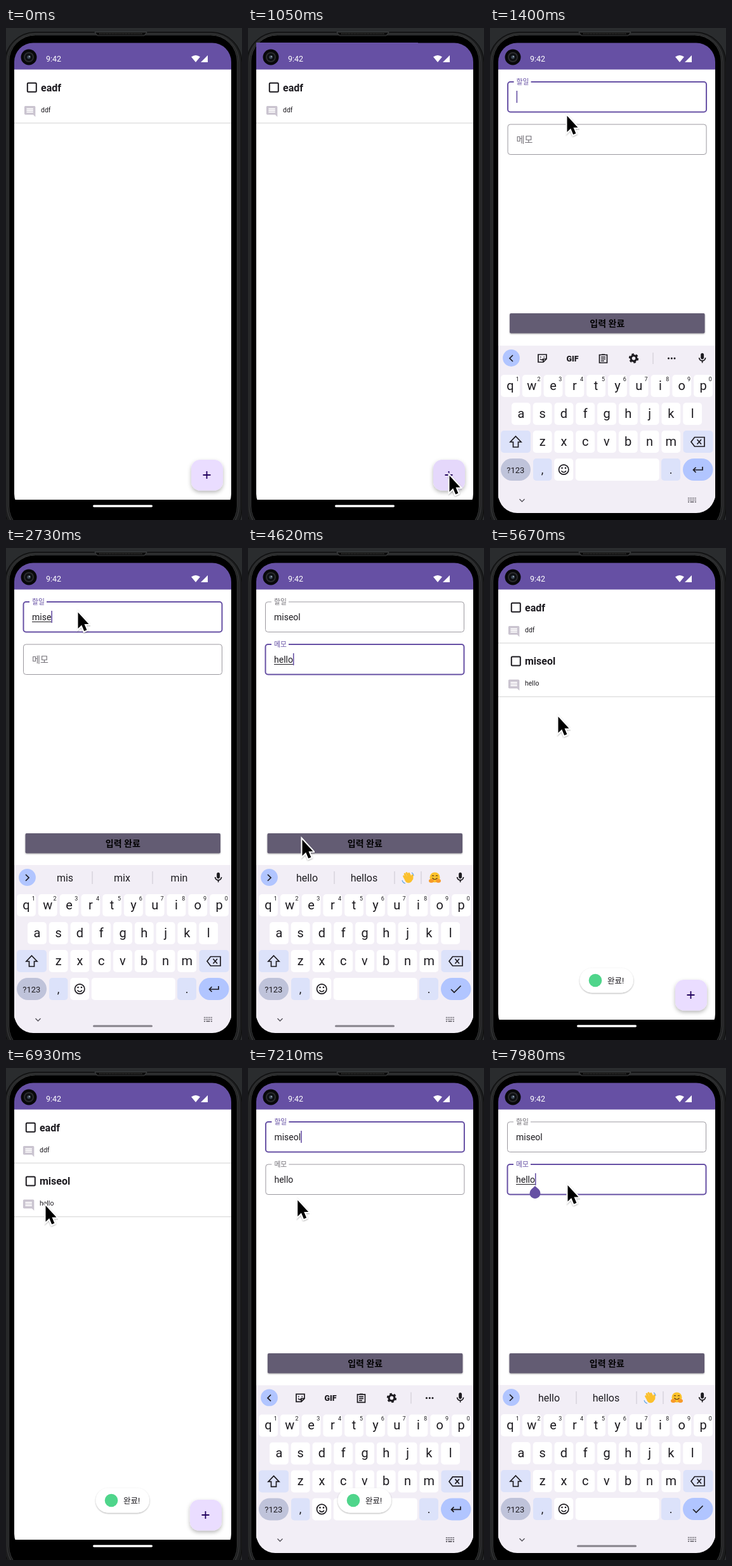
An HTML page for the animation above (8000 ms loop, 372 by 776 pixels).

```html
<!DOCTYPE html>
<html lang="ko">
<head>
<meta charset="utf-8">
<title>Todo app</title>
<style>
html, body { margin: 0; width: 100%; height: 100%; overflow: hidden; background: #2a2c2e; }
svg { display: block; width: 372px; height: 776px; font-family: Roboto, "Noto Sans CJK KR", "Noto Sans CJK", sans-serif; }
.mid { text-anchor: middle; }
.line { fill: none; stroke: #1d1b20; stroke-width: 1.7; }
</style>
</head>
<body>
<script>
const LOOP = 8000;
const WORD = 'miseol', MEMO = 'hello';
const INK = '#1d1b20', PURPLE = '#6650a4';

// ---- markup helpers ----
const rect = (x, y, w, h, r, fill, more = '') =>
  `<rect x="${x}" y="${y}" width="${w}" height="${h}" rx="${r}" fill="${fill}" ${more}/>`;
const circle = (x, y, r, fill, more = '') => `<circle cx="${x}" cy="${y}" r="${r}" fill="${fill}" ${more}/>`;
const text = (x, y, size, s, more = '') => `<text x="${x}" y="${y}" font-size="${size}" ${more}>${s}</text>`;
const mid = (x, y, size, s, more = '') => text(x, y, size, s, 'class="mid" ' + more);
const path = (d, more = 'class="line"') => `<path d="${d}" ${more}/>`;
const g = (id, body, more = '') => `<g id="${id}" ${more}>${body}</g>`;

function phone() {
  return rect(0, 0, 372, 776, 0, '#2a2c2e') +
    rect(-2, 6.5, 374, 800, 48, '#1c1d1e', 'stroke="#0a0a0a"') +
    rect(2, 9, 365, 790, 45, '#0a0a0a', 'stroke="#2e2f30" stroke-width="2.5"') +
    rect(4.5, 11, 360, 785, 42, '#000', 'stroke="#434546" stroke-width="1"') +
    path('M140 6.5H222L218 12H144Z', 'fill="#0c0c0c" stroke="#3f4142"') +
    path('M147 9H215', 'stroke="#333" stroke-width="2" stroke-dasharray="1.5 1"');
}

function statusBar() {
  return rect(13, 23, 342, 42.5, 0, PURPLE) +
    circle(36, 46, 12.5, '#08080a') + circle(36, 46, 8, '#2a2b2e') + circle(36, 46, 6, '#0d0f12') +
    circle(36, 46, 2.8, '#3c4754') + circle(37, 45, 1.2, '#8b99a8') +
    text(63, 53, 12.5, '9:42', 'fill="#fff"') +
    path('M292 45.5Q299 40.5 306 45.5L299 54Z M307 54L318 43V54Z', 'fill="#fff"');
}

function item(y, title, note) {
  return `<g transform="translate(0 ${y})">` +
    rect(33.8, 86.8, 14, 14, 1.5, 'none', `stroke="${INK}" stroke-width="2"`) +
    text(55, 99.5, 16, title, 'font-weight="700"') +
    path('M22 4c0-1.1-.9-2-2-2H4c-1.1 0-2 .9-2 2v12c0 1.1.9 2 2 2h14l4 4zM18 14H6v-2h12zm0-3H6V9h12zm0-3H6V6h12z',
      'fill="#cac4d0" fill-rule="evenodd" transform="translate(27.2 121.2) scale(.87)"') +
    text(55, 132.5, 10.5, note) + rect(-40, 149.3, 460, 1.3, 0, '#dcdcdc') + '</g>';
}

function list() {
  return rect(-40, 65, 460, 679, 0, '#fff') + item(0, 'eadf', 'ddf') + g('second', item(84.6, WORD, MEMO)) +
    rect(292, 681, 50, 48.5, 14, '#eaddff', 'filter="url(#lift)"') +
    g('fabPress', rect(292, 681, 50, 48.5, 14, '#21005d')) +
    path('M316.5 699V711M310.5 705H322.5', 'stroke="#21005d" stroke-width="1.8"');
}

const field = (id, top) => g(id,
  rect(27.5, top, 313, 47.5, 4, 'none', 'class="box"') +
  rect(37, top - 4, 27, 8, 0, '#fff', 'class="gap"') +
  text(41, 0, 14, id === 'todo' ? '할일' : '메모', 'class="label"') +
  text(41, top + 29, 14, '', 'class="value"') +
  rect(41, top + 31, 0, 1, 0, INK, 'class="under"') +
  rect(41, top + 14, 1.6, 19, 0, PURPLE, 'class="caret"'));

function form() {
  return rect(-40, 65, 460, 679, 0, '#fff') + field('todo', 85) + field('memo', 152) +
    g('handle', path('M71 186L77 191.5A8.5 8.5 0 1 1 65 191.5Z', `fill="${PURPLE}"`)) +
    rect(30.5, 450, 307.5, 31.5, 2, '#645b73', 'filter="url(#soft)"') +
    g('btnPress', rect(30.5, 450, 307.5, 31.5, 2, '#000')) +
    mid(184.3, 471, 14, '입력 완료', 'font-weight="700" fill="#000"');
}

function keyboard() {
  const cap = (x, y, w, fill = '#fff', r = 5) => rect(x, y, w, 35, r, fill);
  const row = (s, x0, y) => [...s].map((c, i) => {
    const x = x0 + i * 33.78;
    return cap(x - 14.9, y, 29.8) + mid(x, y + 24, 20, c);
  }).join('');
  const hints = [...'1234567890'].map((c, i) => mid(43.3 + i * 33.78, 556, 9, c)).join('');
  const tools =
    path('M36 515L31 520L36 525') +
    path('M76 514H89V521L84 526H76Z M89 521H84V526 M79 518H80.5M84.5 518H86M79 521Q82 524 84 521') +
    mid(130, 525, 12.5, 'GIF', 'font-weight="900"') +
    path('M172.5 514.5H184.5V527H172.5Z M175 518H182M175 521H182M175 524H180M176 514H181') +
    circle(226.5, 520, 4.4, 'none', `stroke="${INK}" stroke-width="3.2"`) +
    circle(226.5, 520, 6.6, 'none', `stroke="${INK}" stroke-width="2.2" stroke-dasharray="3.6 3.31"`) +
    rect(256.5, 511, 1, 18, 0, '#c9c5d0') +
    [281.5, 286.3, 291].map(x => circle(x, 520, 1.5, INK)).join('');
  const wave = '<g transform="translate(252 520) rotate(-28)" stroke="#fbc02d" stroke-width="3" stroke-linecap="round">' +
    '<ellipse cy="3" rx="6" ry="5.5" fill="#fbc02d" stroke="none"/>' +
    path('M-4.5 2V-5M-1.5 0V-7.5M1.7 0V-7.5M4.6 2V-5M5 5L8 0', '') + '</g>' +
    path('M258 512Q261 514 261 517M243 524Q244 528 248 529', 'fill="none" stroke="#64a8e8" stroke-width="1.2"');
  const hug = circle(294.5, 519.5, 8, '#fcc32c') +
    path('M290 517.5Q291.5 515.5 293 517.5M296 517.5Q297.5 515.5 299 517.5M290.5 520.5Q294.5 525 298.5 520.5',
      'fill="none" stroke="#5d3a14" stroke-width="1.2"') +
    '<ellipse cx="289" cy="525" rx="4" ry="3" fill="#f79a2a"/><ellipse cx="300" cy="525" rx="4" ry="3" fill="#f79a2a"/>';
  const words = path('M31 515L36 520L31 525') + rect(135.5, 510, 1, 20, 0, '#c9c5d0') + rect(230.5, 510, 1, 20, 0, '#c9c5d0') +
    [93, 183, 273].map((x, i) => mid(x, 525.5, 16, '', `id="w${i}"`)).join('') +
    g('emoji', rect(272.5, 510, 1, 20, 0, '#c9c5d0') + wave + hug);
  const dots = [0, 1, 2].map(r => path(`M312 ${740.5 + r * 3}H325`,
    `stroke="#55525a" stroke-width="1.6" stroke-dasharray="${r < 2 ? '1.6 1.2' : '2 1.5 6 1.5'}"`)).join('');
  return rect(13, 500, 342, 270, 0, '#f2eef6') + circle(33.5, 519.5, 13.4, '#b1c5ff') +
    g('tools', tools) + g('words', words) +
    path('M12 14c1.66 0 3-1.34 3-3V5c0-1.66-1.34-3-3-3S9 3.34 9 5v6c0 1.66 1.34 3 3 3zm5-3c0 2.76-2.24 5-5 5s-5-2.24-5-5H5c0 3.53 2.61 6.43 6 6.92V21h2v-3.08c3.39-.49 6-3.39 6-6.92h-2z',
      `fill="${INK}" transform="translate(324.8 510) scale(.82)"`) +
    row('qwertyuiop', 32, 546) + hints + row('asdfghjkl', 48.9, 590) + row('zxcvbnm', 82.6, 634) +
    cap(17, 634, 47, '#dce2fa') + path('M40.5 643L49 652H44.5V660H36.5V652H32Z') +
    cap(304.5, 634, 47, '#dce2fa') + path('M317 651.8L322.5 644.5H338V659H322.5ZM326.5 648L333 655.5M333 648L326.5 655.5') +
    cap(17, 678, 47, '#bfc3da', 17.5) + mid(40.3, 700.5, 13, '?123') +
    cap(68, 678, 29.5, '#dce2fa') + mid(82.6, 702, 18, ',') +
    cap(101.2, 678, 30) + circle(116.2, 695.5, 7.7, 'none', 'class="line"') +
    path('M112.5 697.5Q116.2 702 120 697.5') + circle(113.5, 693, 1.3, INK) + circle(119, 693, 1.3, INK) +
    cap(134.8, 678, 132) + cap(270, 678, 30, '#dce2fa') + mid(285, 702, 18, '.') +
    cap(304, 678, 47.5, '#b1c5ff', 17.5) +
    path('M335 691V696H320.5M324.5 692L320.5 696L324.5 700', 'class="line" id="enter"') +
    path('M320 696L325 701L335.5 690.5', 'class="line" id="check"') +
    path('M46.5 742L50.5 746L54.5 742', 'fill="none" stroke="#55525a" stroke-width="1.4"') + dots;
}

document.body.innerHTML = `<svg viewBox="0 0 372 776" fill="${INK}">
<defs><clipPath id="screen">${rect(13, 23.5, 342, 741.5, 30, '#000')}</clipPath>
<filter id="lift" x="-30%" y="-30%" width="160%" height="170%"><feDropShadow dx="0" dy="3" stdDeviation="3" flood-opacity=".28"/></filter>
<filter id="soft" x="-10%" y="-30%" width="120%" height="180%"><feDropShadow dx="0" dy="1" stdDeviation="1.2" flood-opacity=".35"/></filter></defs>
${phone()}
<g clip-path="url(#screen)">${g('list', list())}${g('form', form())}${statusBar()}
${rect(13, 744, 342, 30, 0, '#000')}${rect(137, 752.3, 94, 3.4, 1.7, '#fff')}
${g('kb', keyboard())}${rect(137, 752.5, 94, 3, 1.5, '#85818a', 'id="pill"')}
${g('toast', rect(141.5, 662.5, 84.5, 39, 19.5, '#fff', 'filter="url(#soft)"') + circle(166, 682, 10.3, '#4fd58b') + text(185, 687, 12.5, '완료!'))}</g>
${g('ring', circle(0, 0, 44.5, 'none', 'stroke="#222" stroke-width="2.5" opacity=".6"'))}
${g('cursor', path('M.5 1V26.5L6.2 21L10.2 30.5L14.4 28.7L10.5 19.5H17.5Z',
    'fill="#000" stroke="#fff" stroke-width="4" paint-order="stroke" filter="url(#soft)"'))}
</svg>`;

// ---- timing ----
const $ = id => document.getElementById(id);
const clamp = v => Math.max(0, Math.min(1, v));
const span = (t, a, b) => clamp((t - a) / (b - a));
const show = (id, o) => $(id).setAttribute('opacity', +o);
const move = (id, x, y) => $(id).setAttribute('transform', `translate(${x.toFixed(2)} ${y.toFixed(2)})`);
const last = (rows, t) => rows.filter(r => r[0] <= t).pop();
const smooth = p => p * p * (3 - 2 * p);
const out = p => 1 - (1 - p) ** 4;

const bez = (u, a, b, c, d) => (1 - u) ** 3 * a + 3 * (1 - u) ** 2 * u * b + 3 * (1 - u) * u * u * c + u ** 3 * d;
// emphasized easing: a fast start followed by a very long settle
function emphasized(p) {
  const [xs, ys] = p < 1 / 6 ? [[0, .05, .1333, 1 / 6], [0, 0, .06, .4]] : [[1 / 6, .2083, .25, 1], [.4, .82, 1, 1]];
  let lo = 0, hi = 1;
  for (let i = 0; i < 24; i++) {
    const m = (lo + hi) / 2;
    if (bez(m, ...xs) < p) lo = m; else hi = m;
  }
  return bez(lo, ...ys);
}

const OPEN1 = 1100, CLOSE = 5230, OPEN2 = 6894, SLIDE = 450, SHIFT = 34;
const FOCUS1 = 3120, FOCUS2 = 7690;
const todoKeys = [2450, 2520, 2590, 2730, 2870, 2940];
const memoKeys = [3640, 3780, 4060, 4200, 4410];
const carets = [0, 1180, ...todoKeys, FOCUS1, ...memoKeys, 7000, FOCUS2];
const suggestions = [
  [0], [2450, 'my', 'me', 'more'], [2520, 'mi', 'min', 'mid'], [2590, 'mis', 'miss', 'mid'],
  [2730, 'mis', 'mix', 'min'], [2870, 'mise', 'mist', 'miss'], [2940, WORD, 'mist', 'miss'], [FOCUS1],
  [3640, 'he', 'hi', 'have'], [3780, 'he', 'hey', 'her'], [4060, 'hello', 'help', 'held'],
  [4200, 'hello', 'hell', 'hellos'], [4410, 'hello', 'hellos'], [5500], [FOCUS2, 'hello', 'hellos']
];
const pointer = [
  [70, 366, 766], [420, 322, 712], [840, 317, 705], [1080, 317, 705], [1400, 121, 137.5], [1610, 113, 100.5],
  [4410, 113, 100.5], [4600, 85, 459], [5180, 85, 459], [5600, 107, 265], [5700, 107, 265], [6060, 67, 223],
  [6560, 58, 214], [6790, 58, 214], [6930, 62, 216], [7070, 62, 216], [7490, 122, 184], [LOOP, 122, 184]
];
const clicks = [[650, 840], [4830, 5040], [6540, 6790], [7560, 7690]];

function drawField(id, top, s) {
  const q = c => $(id).querySelector('.' + c), set = (c, o) => { for (const k in o) q(c).setAttribute(k, o[k]); };
  set('box', { stroke: s.focus ? PURPLE : '#9b989f', 'stroke-width': s.focus ? 2 : 1 });
  set('gap', { opacity: +(s.lift > .3) });
  set('label', {
    y: top + 28.5 - 24.5 * s.lift, 'font-size': 14 - 3.2 * s.lift,
    fill: s.focus ? PURPLE : '#716e75'
  });
  const v = q('value');
  if (v.textContent !== s.text) v.textContent = s.text;
  const w = s.text ? v.getComputedTextLength() : 0;
  set('under', { width: s.compose ? w : 0 });
  set('caret', { x: 41 + w, opacity: +(s.focus && s.blink) });
}

function render(t) {
  const again = t >= 6000, o = again ? OPEN2 : OPEN1;
  const enter = emphasized(span(t, o, o + SLIDE)), leave = emphasized(span(t, CLOSE, CLOSE + SLIDE));
  const closing = t >= CLOSE && !again;
  move('list', closing ? -SHIFT * (1 - leave) : -SHIFT * enter, 0);
  move('form', closing ? SHIFT * leave : SHIFT * (1 - enter), 0);
  show('form', closing ? 1 - span(t, CLOSE + 35, CLOSE + 118) : span(t, o + 50, o + 133));
  show('second', t >= CLOSE);

  const kb = closing ? 1 - smooth(span(t, CLOSE, CLOSE + 220)) : out(span(t, o + 60, o + 380));
  move('kb', 0, 268 * (1 - kb));
  show('pill', closing ? 0 : again ? span(t, 7560, 7700) : (t >= 1820) * .5 + (t >= 1960) * .5);

  const memoFocus = again ? t >= FOCUS2 : t >= FOCUS1;
  const typed = (s, keys) => again ? s : s.slice(0, keys.filter(k => k <= t).length);
  const since = t - carets.filter(k => k <= t).pop(), blink = since % 1000 < 500;
  drawField('todo', 85, {
    text: typed(WORD, todoKeys), focus: !memoFocus, compose: !again && !memoFocus, lift: 1, blink
  });
  drawField('memo', 152, {
    text: typed(MEMO, memoKeys), focus: memoFocus, compose: memoFocus,
    lift: again ? 1 : smooth(span(t, FOCUS1, 3290)), blink
  });
  show('handle', t >= 7770);
  show('enter', !memoFocus);
  show('check', memoFocus);

  const [, ...words] = last(suggestions, t);
  show('tools', !words.length);
  show('words', words.length > 0);
  show('emoji', words.length === 2);
  for (let i = 0; i < 3; i++) $('w' + i).textContent = words[i] || '';

  show('fabPress', .12 * span(t, 650, 780) * (1 - span(t, 860, 1100)));
  show('btnPress', .2 * span(t, 4830, 4970) * (1 - span(t, 5040, 5180)));
  const rise = out(span(t, 5400, 5620));
  move('toast', 0, 30 * (1 - rise));
  show('toast', rise * (1 - span(t, 7760, 7920)));

  const a = last(pointer, t) || pointer[0], b = pointer[pointer.indexOf(a) + 1] || a;
  const p = a === b ? 0 : smooth(span(t, a[0], b[0]));
  const x = a[1] + (b[1] - a[1]) * p, y = a[2] + (b[2] - a[2]) * p;
  move('cursor', x, y);
  move('ring', x - 1, y);
  show('cursor', t >= 70);
  show('ring', clicks.some(([s, e]) => t >= s && t < e));
}

const start = performance.now();
function tick(now) {
  render(Math.max(0, now - start) % LOOP);
  requestAnimationFrame(tick);
}
render(0);
requestAnimationFrame(tick);
</script>
</body>
</html>
```
